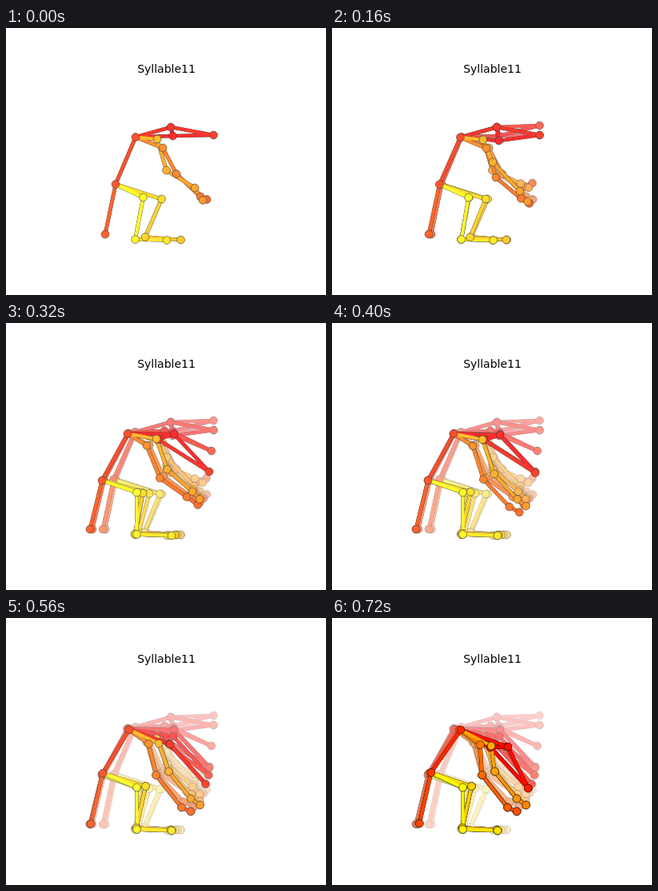
An HTML page with a canvas that plays this animation: 400x334 px, repeating every 800 ms.

```html
<!DOCTYPE html>
<html lang="en">
<head>
<meta charset="utf-8">
<title>Syllable11</title>
<style>
  html, body { margin: 0; width: 100%; height: 100%; overflow: hidden; background: #fff; }
  canvas { display: block; }
</style>
</head>
<body>
<canvas id="stage" width="400" height="334"></canvas>
<script>
const ctx = document.getElementById('stage').getContext('2d');
const STEPS = 10, STEP_MS = 80, VEIL = 0.18;
const LINE = 4.17, OUTLINE = 0.56, RADIUS = 4.9;

// Step windows in which each body part leans over, then slumps across (x) and down (y).
const head = { lean: [2, 4], x: [5.5, 8.5], y: [4.5, 8] };
const trunk = { lean: [1.5, 3.5], x: [6, 9], y: [4.5, 8] };
const arm = { lean: [0.5, 4], x: [3.8, 5.8], y: [3.8, 5.8] };
const leg = { lean: [1.5, 4], x: [3.8, 5.8], y: [3.8, 5.8] };

// A joint moves from its start to a lean and on to a slump; some flick upwards once.
const joints = [];
const joint = (part, start, lean, slump = lean, flick = 0, flickStep = 1) =>
  joints.push({ part, start, lean, slump, flick, flickStep }) - 1;

const earR = joint(head, [208.5, 135], [210, 139], [198, 162], -6, 2);
const earL = joint(head, [206, 124], [190, 145.5], [220, 161]);
const nose = joint(head, [259.5, 134], [254, 186], [245, 213], 12);
const neck = joint(trunk, [162, 136.5], [152, 138.5], [161, 140]);
const back = joint(trunk, [137, 195.5], [120, 197], [124, 193.5]);
const tail = joint(trunk, [124, 258], [105, 258], [109.5, 257]);

const pawR = joint(arm, [251, 214.5], [240, 227], [231, 242], 21);
const wristR = joint(arm, [243, 211], [226, 217], [219.5, 237], 13);
const elbowR = joint(arm, [213, 182.5], [192.5, 194], [187.5, 196.5]);
const shoulderR = joint(trunk, [196, 150], [176, 153.5], [185.5, 158.5]);

const pawL = joint(arm, [246, 215.5], [242, 220], [242.5, 234], 16);
const wristL = joint(arm, [236, 200], [233, 210.5], [231, 226], 6);
const elbowL = joint(arm, [200.5, 178], [201.5, 183], [203.5, 192], 12, 2);
const shoulderL = joint(trunk, [189, 139], [188, 145], [199, 160]);

const footR = joint(leg, [218.5, 265], [211.5, 265], [206, 265]);
const kneeR = joint(leg, [174, 261.5], [161, 264], [163, 262.5]);
const hipR = joint(leg, [194.5, 214], [171, 213], [174.5, 210.5]);
const footL = joint(leg, [201, 265.5], [207, 266]);
const kneeL = joint(leg, [161.5, 264.5], [163.5, 264.5]);
const hipL = joint(leg, [171.5, 212], [163.5, 212]);

// A bone takes the colour of its first joint.
const bones = [
  [earR, nose], [earL, nose], [earR, earL], [earR, neck], [earL, neck],
  [neck, back], [tail, back],
  [pawR, wristR], [wristR, elbowR], [elbowR, shoulderR], [shoulderR, neck],
  [pawL, wristL], [wristL, elbowL], [elbowL, shoulderL], [shoulderL, neck],
  [footR, kneeR], [kneeR, hipR], [hipR, back],
  [footL, kneeL], [kneeL, hipL], [hipL, back]
];

const colour = i => `rgb(255, ${Math.round(255 * i / (joints.length - 1))}, 0)`;

function ease([from, to], step) {
  const u = Math.min(1, Math.max(0, (step - from) / (to - from)));
  return u * u * (3 - 2 * u);
}

function position({ part, start, lean, slump, flick, flickStep }, step) {
  const along = (axis, window) => start[axis]
    + (lean[axis] - start[axis]) * ease(part.lean, step)
    + (slump[axis] - lean[axis]) * ease(window, step);
  const lift = flick * Math.max(0, 1 - Math.abs(step - flickStep));
  return [along(0, part.x), along(1, part.y) - lift];
}

function drawBone(from, to, width, style) {
  ctx.lineWidth = width;
  ctx.strokeStyle = style;
  ctx.beginPath();
  ctx.moveTo(...from);
  ctx.lineTo(...to);
  ctx.stroke();
}

function drawPose(step) {
  const points = joints.map(j => position(j, step));
  for (const [a, b] of bones) drawBone(points[a], points[b], LINE + OUTLINE, '#000');
  for (const [a, b] of bones) drawBone(points[a], points[b], LINE, colour(a));
  ctx.lineWidth = OUTLINE;
  ctx.strokeStyle = '#000';
  points.forEach(([x, y], i) => {
    ctx.fillStyle = colour(i);
    ctx.beginPath();
    ctx.arc(x, y, RADIUS, 0, 2 * Math.PI);
    ctx.fill();
    ctx.stroke();
  });
}

function render(now) {
  const current = Math.floor(now / STEP_MS) % STEPS;
  ctx.fillStyle = '#fff';
  ctx.fillRect(0, 0, 400, 334);
  for (let step = 0; step <= current; step++) {
    drawPose(step);
    // A white veil fades every pose but the last.
    if (step < STEPS - 1) {
      ctx.fillStyle = `rgba(255, 255, 255, ${VEIL})`;
      ctx.fillRect(0, 0, 400, 334);
    }
  }
  ctx.fillStyle = '#000';
  ctx.font = '14px "DejaVu Sans", sans-serif';
  ctx.textAlign = 'center';
  ctx.fillText('Syllable11', 200.5, 56);
  requestAnimationFrame(render);
}
render(performance.now());
</script>
</body>
</html>
```
